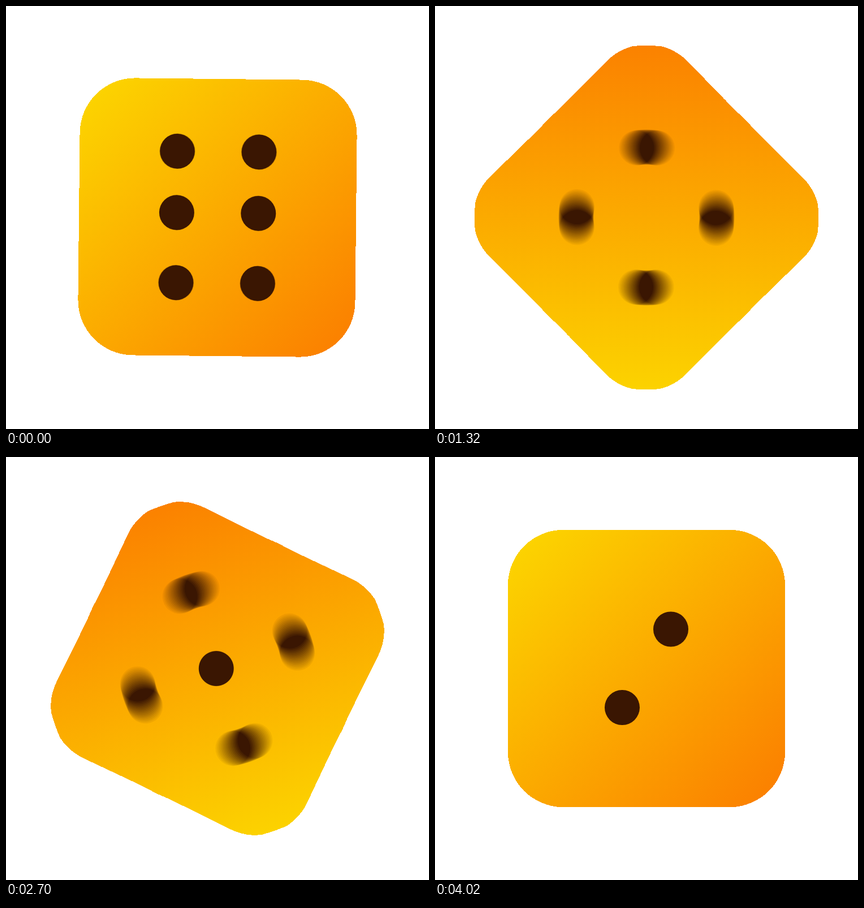
Animation of 748 by 748 pixels, one loop 4440 ms. Source, as an HTML page with a canvas:

```html
<!DOCTYPE html>
<html lang="en">
<head>
<meta charset="utf-8">
<title>Rolling die</title>
<style>
  html, body { margin: 0; width: 100%; height: 100%; overflow: hidden; background: #fff; }
  canvas { display: block; width: 100vmin; height: 100vmin; }
</style>
</head>
<body>
<canvas id="stage" width="748" height="748"></canvas>
<script>
const SIZE = 748, HALF = 245, CORNER = 97.5, DOT = 31;
const LOOP = 4440, STEP = 60, STEPS = 67;
const TURNS = 10, SAMPLES = 16, SHUTTER = 0.25;

// Dot centres relative to the middle of the die
const square = d => [[-d, -d], [d, -d], [-d, d], [d, d]];
const two = [[43, -69.5], [-43, 69]];
const three = [[0, -69], [-84.5, 68], [84.5, 68]];
const four = square(88);
const five = [...square(101.7), [2, -1]];
const six = [-116.5, -8, 116].flatMap(y => [[-72.2, y], [72.2, y]]);
const faces = [six, two, four, three, five, two];

const stage = document.getElementById('stage').getContext('2d');
const bodyLayer = makeLayer();
const dotLayer = makeLayer();

function makeLayer() {
  const canvas = document.createElement('canvas');
  canvas.width = canvas.height = SIZE;
  return canvas.getContext('2d', { willReadFrequently: true });
}

const progress = step => Math.min(1, Math.max(0, (step + 0.5) / STEPS));

function angleAt(step) {
  const x = progress(step);
  return TURNS * 2 * Math.PI * x * x * (3 - 2 * x);
}

function turn(ctx, angle) {
  ctx.setTransform(1, 0, 0, 1, SIZE / 2, SIZE / 2);
  ctx.rotate(angle);
}

// Sums the shape over the open shutter as pure coverage
function expose(ctx, step, trace) {
  ctx.resetTransform();
  ctx.globalCompositeOperation = 'source-over';
  ctx.clearRect(0, 0, SIZE, SIZE);
  ctx.globalCompositeOperation = 'lighter';
  ctx.fillStyle = `rgba(0, 0, 0, ${1 / SAMPLES})`;
  for (let i = 0; i < SAMPLES; i++) {
    const shift = (i - (SAMPLES - 1) / 2) / SAMPLES * SHUTTER;
    turn(ctx, angleAt(step + shift));
    ctx.beginPath();
    trace(ctx);
    ctx.fill();
  }
}

function tint(ctx, paint) {
  ctx.globalCompositeOperation = 'source-in';
  ctx.fillStyle = paint;
  ctx.fillRect(-SIZE, -SIZE, 2 * SIZE, 2 * SIZE);
}

function hardenEdges(ctx) {
  const image = ctx.getImageData(0, 0, SIZE, SIZE);
  const data = image.data;
  for (let i = 3; i < data.length; i += 4) data[i] = data[i] >= 128 ? 255 : 0;
  ctx.putImageData(image, 0, 0);
}

function traceBody(ctx) {
  ctx.roundRect(-HALF, -HALF, 2 * HALF, 2 * HALF, CORNER);
}

function traceDots(ctx, dots) {
  for (const [x, y] of dots) {
    ctx.moveTo(x + DOT, y);
    ctx.arc(x, y, DOT, 0, 2 * Math.PI);
  }
}

const gold = bodyLayer.createLinearGradient(-HALF, -HALF, HALF, HALF);
gold.addColorStop(0, '#fcd800');
gold.addColorStop(1, '#fb7c00');

function draw(step) {
  const index = Math.floor(progress(step) * faces.length);
  const dots = faces[Math.min(index, faces.length - 1)];

  expose(bodyLayer, step, traceBody);
  hardenEdges(bodyLayer);
  turn(bodyLayer, angleAt(step));
  tint(bodyLayer, gold);

  expose(dotLayer, step, ctx => traceDots(ctx, dots));
  tint(dotLayer, '#3a1602');

  stage.clearRect(0, 0, SIZE, SIZE);
  stage.drawImage(bodyLayer.canvas, 0, 0);
  stage.drawImage(dotLayer.canvas, 0, 0);
}

let shown = -1;
function tick() {
  const time = performance.now() % LOOP;
  const step = Math.min(STEPS, Math.floor(time / STEP));
  if (step !== shown) draw(shown = step);
  requestAnimationFrame(tick);
}
tick();
</script>
</body>
</html>
```
